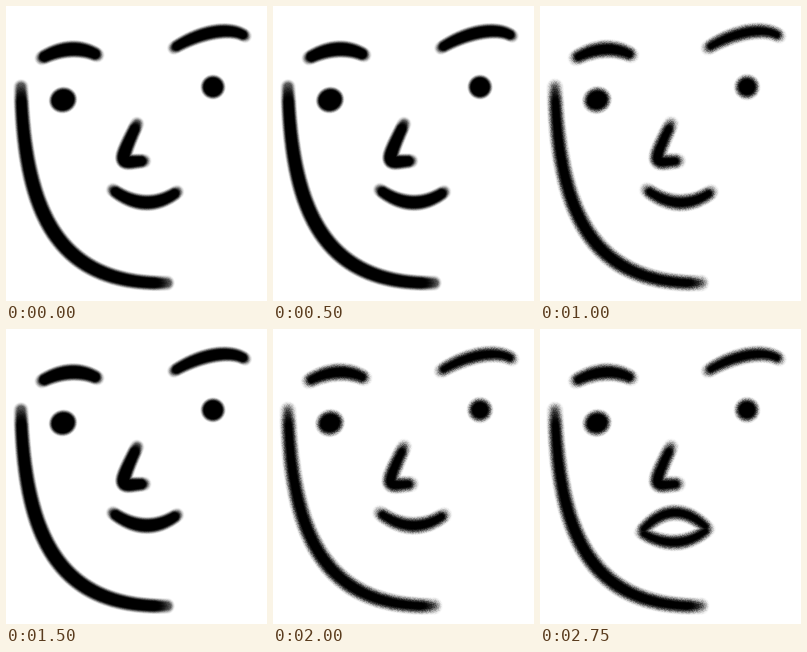
An HTML page with a canvas that plays this animation: 261x295 px, repeating every 3 s.

```html
<!DOCTYPE html>
<html lang="en">
<head>
<meta charset="utf-8">
<title>Talking face</title>
<style>
  html, body { margin: 0; width: 100%; height: 100%; overflow: hidden; background: #fff; }
  canvas { display: block; width: 261px; height: 295px; }
</style>
</head>
<body>
<canvas id="stage" width="261" height="295"></canvas>
<script>
const W = 261, H = 295, STEP = 250, COUNT = 12;
const ctx = document.getElementById('stage').getContext('2d');

// A stroke is a Bezier curve drawn with a brush of radius r.
const stroke = (r, ...pts) => ({ r, pts });

const head = [
  stroke(7.2, [15, 81], [18, 210], [54, 279], [161, 277]),        // jaw
  stroke(7, [36, 52], [66, 36], [91, 49]),                        // left brow
  stroke(6.2, [168, 42], [190, 28], [222, 19], [239, 30]),        // right brow
  stroke(11.3, [54, 95], [60, 93]),                               // left eye
  stroke(10.5, [206, 81], [208, 81]),                             // right eye
  stroke(6.8, [131, 118], [110, 162], [115, 156], [138, 155])     // nose
];

const mouths = {
  smile: [stroke(6.6, [107, 184], [140, 208], [171, 186])],
  open: [
    stroke(6, [101, 203], [133, 166], [168, 200]),
    stroke(6, [101, 203], [137, 225], [168, 200])
  ],
  wide: [
    stroke(5.6, [107, 184], [140, 196], [172, 184]),
    stroke(5.6, [107, 185], [112, 241], [167, 241], [172, 185])
  ]
};

const brushes = {
  ink: { soft: 4.8, grow: 0.4, grain: 0.06, seed: 7 },
  chalk: { soft: 7.5, grow: 0, grain: 0.2, seed: 23 }
};

const inkSteps = [0, 2, 5, 6];
const brushAt = i => inkSteps.includes(i) ? 'ink' : 'chalk';
const mouthAt = i => i % 2 === 0 ? 'smile' : i % 4 === 1 ? 'wide' : 'open';

function randomFrom(seed) {
  return () => {
    seed = (Math.imul(seed, 1664525) + 1013904223) >>> 0;
    return seed / 4294967296;
  };
}

function bezier(pts, t) {
  while (pts.length > 1) {
    pts = pts.slice(1).map((p, i) => p.map((v, k) => pts[i][k] + (v - pts[i][k]) * t));
  }
  return pts[0];
}

function stamp(mask, x, y, r, soft, strength) {
  const reach = r + soft / 2;
  for (let py = Math.max(0, Math.floor(y - reach)); py <= Math.min(H - 1, y + reach); py++) {
    for (let px = Math.max(0, Math.floor(x - reach)); px <= Math.min(W - 1, x + reach); px++) {
      const k = (reach - Math.hypot(px + 0.5 - x, py + 0.5 - y)) / soft;
      const i = py * W + px;
      mask[i] = Math.max(mask[i], Math.min(1, k) * strength);
    }
  }
}

// Pressure is lighter at both ends: thinner and fainter.
function drawStroke(mask, { r, pts }, { soft, grow }) {
  const n = 300;
  for (let j = 0; j <= n; j++) {
    const t = j / n;
    const [x, y] = bezier(pts, t);
    const radius = (r + grow) * (0.82 + 0.18 * Math.sin(Math.PI * t));
    const strength = Math.min(1, 0.6 + 10 * Math.min(t, 1 - t));
    stamp(mask, x, y, radius, soft, strength);
  }
}

function render(brushName, mouthName) {
  const brush = brushes[brushName];
  const mask = new Float32Array(W * H);
  for (const s of [...head, ...mouths[mouthName]]) drawStroke(mask, s, brush);

  const rand = randomFrom(brush.seed);
  const img = ctx.createImageData(W, H);
  mask.forEach((m, i) => {
    const a = m * m * (3 - 2 * m);
    const noise = (rand() - 0.5) * brush.grain * 4 * a * (1 - a);
    const v = 255 * (1 - a - noise);
    img.data.set([v, v, v, 255], i * 4);
  });
  return img;
}

const cache = {};
const pictures = Array.from({ length: COUNT }, (_, i) => {
  const brush = brushAt(i), mouth = mouthAt(i);
  return cache[brush + mouth] ||= render(brush, mouth);
});

function tick() {
  ctx.putImageData(pictures[Math.floor(performance.now() / STEP) % COUNT], 0, 0);
  requestAnimationFrame(tick);
}
tick();
</script>
</body>
</html>
```
